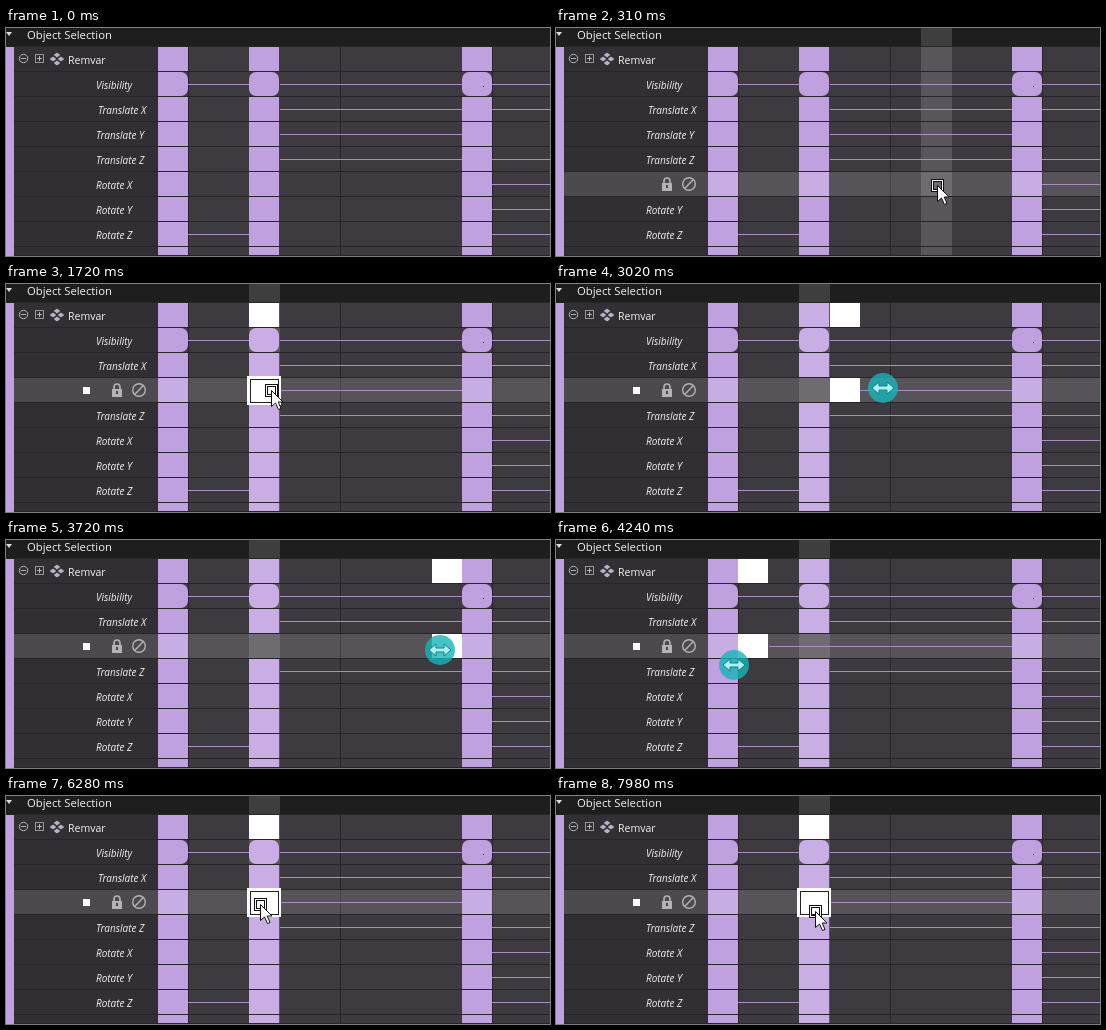
An HTML page with a canvas for the animation above (8000 ms loop, 544 by 228 pixels).

```html
<!DOCTYPE html>
<html>
<head>
<meta charset="utf-8">
<style>
html, body { margin: 0; width: 544px; height: 228px; overflow: hidden; background: #1f1e1f; }
canvas { display: block; }
</style>
</head>
<body>
<canvas id="stage" width="544" height="228"></canvas>
<script>
const c = document.getElementById('stage').getContext('2d');
const LOOP = 8000, LEFT = 152, CELL = 30.4, ROW = 25;
const SELECT = 1200, GRAB = 3020, DROP = 6280;
const PURPLE = '#bfa1df', INK = '#27252a', ICON = '#b4b3b6';

// Pointer path: time, x, y
const path = [
  [50, 500, 208], [310, 381, 157], [840, 272, 113], [960, 272, 113], [1020, 265, 106],
  [1140, 265, 106], [1200, 270, 113], [1450, 270, 113], [1720, 265, 106],
  [2459, 265, 106], [2460, 257, 97], [3019, 257, 97], [3020, 326, 104],
  [3220, 528, 104], [3530, 528, 104], [4240, 178, 125], [4690, 178, 125],
  [5330, 450, 114], [5510, 452, 115], [5650, 452, 115], [6280, 254, 108],
  [6729, 254, 108], [6730, 258, 112], [6790, 261, 117], [7979, 261, 117], [7980, 259, 115]
];

// Rows: label, label x, [from, to] columns of the value lines
const rows = [
  ['Visibility', 90, [1, 3], [4, 10], [11, 13]],
  ['Translate X', 92, [4, 10], [11, 13]],
  ['Translate Y', 90],
  ['Translate Z', 90, [4, 10], [11, 13]],
  ['Rotate X', 90, [11, 13]],
  ['Rotate Y', 90, [11, 13]],
  ['Rotate Z', 90, [1, 3], [11, 13]],
  ['', 90]
];

const colX = k => Math.round(LEFT + k * CELL);
const rowY = r => 44 + r * ROW;
const cellAt = x => Math.floor((x - LEFT) / CELL);

function pointer(t) {
  const i = path.findIndex(p => p[0] > t);
  if (i < 0) return path[path.length - 1].slice(1);
  if (!i) return null;
  const a = path[i - 1], b = path[i], u = (t - a[0]) / (b[0] - a[0]);
  return [1, 2].map(n => Math.round(a[n] + (b[n] - a[n]) * u));
}

function box(x, y, w, h, color) {
  c.fillStyle = color;
  c.fillRect(x, y, w, h);
}

function frame(x, y, w, h, color, width = 1) {
  c.strokeStyle = color;
  c.lineWidth = width;
  c.strokeRect(x, y, w, h);
}

function shape(points, fill, stroke) {
  c.beginPath();
  points.forEach(p => c.lineTo(...p));
  c.closePath();
  if (fill) { c.fillStyle = fill; c.fill(); }
  if (stroke) { c.strokeStyle = stroke; c.lineWidth = 1; c.stroke(); }
}

function text(s, x, y, font) {
  c.fillStyle = '#f2f2f2';
  c.font = font + ' "Open Sans", "Noto Sans", sans-serif';
  c.fillText(s, x, y);
}

function ring(x, y, r, width) {
  c.strokeStyle = ICON;
  c.lineWidth = width;
  c.beginPath();
  c.arc(x, y, r, 0, 7);
  c.stroke();
}

function key(k, y, color = PURPLE) {
  box(colX(k), y, 30, 24, color);
}

function tree() {
  shape([[0, 4], [6, 4], [3, 8]], '#dcdcdc');
  text('Object Selection', 21, 11, '500 11.3px');
  ring(17.5, 30.5, 4.2, 1);
  box(15, 30, 5, 1, ICON);
  frame(29.5, 26.5, 8, 8, '#98969b');
  box(31, 30, 5, 1, ICON);
  box(33, 28, 1, 5, ICON);
  for (const [x, y] of [[51, 27], [47, 31], [55, 31], [51, 35]])
    shape([[x - 4, y], [x, y - 3], [x + 4, y], [x, y + 3]], '#b9b2c4', '#322f34');
  text('Remvar', 62, 36, '500 10.5px');
}

function rowIcons(y) {
  box(106, y - 1, 10, 8, ICON);
  c.strokeStyle = ICON;
  c.lineWidth = 1.6;
  c.beginPath();
  c.moveTo(108, y);
  c.lineTo(108, y - 3);
  c.arc(111, y - 3, 3, Math.PI, 0);
  c.lineTo(114, y);
  c.stroke();
  box(110, y + 1, 2, 3, '#4c4a4e');
  ring(133, y, 6.3, 1.4);
  c.beginPath();
  c.moveTo(128.7, y + 4.5);
  c.lineTo(137.3, y - 4.5);
  c.stroke();
}

function arrow(x, y) {
  frame(x - 4.5, y - 4.5, 10, 10, '#fff', 3);
  frame(x - 5.5, y - 5.5, 12, 12, '#111');
  frame(x - 3.5, y - 3.5, 8, 8, '#111');
  const tip = [[0, 0], [0, 16], [4, 12.5], [7, 19], [9.5, 18], [6.7, 11.5], [11.5, 11.5]];
  shape(tip.map(p => [x + p[0] + .5, y + p[1] + .5]), '#fff', '#111');
}

function dragHandle(x, y) {
  c.globalAlpha = .8;
  c.fillStyle = '#15b5b8';
  c.beginPath();
  c.arc(x, y, 15, 0, 7);
  c.fill();
  c.globalAlpha = 1;
  const half = [[-11, 0], [-4, -6], [-4, -2], [4, -2], [4, -6]];
  const all = half.concat(half.map(p => [-p[0], -p[1]]));
  shape(all.map(p => [x + p[0], y + p[1]]), '#a9f3f3', '#147f84');
}

function draw(t) {
  const pos = pointer(t);
  const drag = t >= GRAB && t < DROP, selected = t >= SELECT;
  let moved = 3;
  if (drag) moved = t < 3080 ? 4 : Math.max(1, Math.min(9, cellAt(pos[0])));
  const hoverRow = !pos ? -1 : drag ? 2 : Math.floor((pos[1] - 44) / ROW);
  const hoverCol = !pos ? -1 : drag ? 3 : cellAt(pos[0]);

  box(0, 0, 544, 228, '#1f1e1f');
  box(0, 19, 8, 209, PURPLE);
  box(8, 19, 144, 209, '#322f34');
  box(LEFT, 19, 392, 209, '#3d3a40');
  for (const k of [1, 6, 11]) box(colX(k), 19, 1, 209, INK);

  for (const k of [0, 3, 10]) {
    key(k, 19);
    rows.forEach((row, r) => {
      if (r == 2 && k == 3) return;
      if (r) return key(k, rowY(r));
      c.fillStyle = PURPLE;
      c.beginPath();
      c.roundRect(colX(k), 44, 30, 24, k ? 7 : [0, 7, 7, 0]);
      c.fill();
    });
  }
  box(477, 58, 1, 1, '#111');

  // Row and column under the pointer
  if (hoverRow >= 0) box(8, rowY(hoverRow), 536, 24, 'rgba(255,255,255,.13)');
  if (hoverCol >= 0) box(colX(hoverCol), 0, 31, 228, 'rgba(255,255,255,.14)');

  box(8, 18, 536, 1, INK);
  for (let r = 0; r < 8; r++) box(8, rowY(r) - 1, 536, 1, INK);
  box(8, 227, 536, 1, INK);

  rows.forEach(([, , ...spans], r) => {
    if (r == 2) spans = [[moved + 1, 10]];
    for (const [a, b] of spans)
      if (b > a) box(colX(a), rowY(r) + 12, colX(b) - colX(a), 1, '#a78fc2');
  });

  const light = hoverRow == 2 ? '#d2b8eb' : hoverCol == 3 ? '#c8aee4' : PURPLE;
  key(moved, rowY(2), selected ? '#fff' : light);
  if (selected) key(moved, 19, '#fff');

  tree();
  rows.forEach(([label, x], r) => {
    if (r == hoverRow) rowIcons(rowY(r) + 12);
    else text(label, x, rowY(r) + 17, 'italic 500 10px');
  });
  if (selected) box(77, 103, 7, 7, '#fff');

  if (!pos) return;
  if (drag) return dragHandle(...pos);
  if ([0, 3, 10].includes(hoverCol) && (hoverRow != 2 || hoverCol == 3)) {
    const x = colX(hoverCol), y = rowY(hoverRow);
    frame(x - .5, y - .5, 31, 26, '#fff', 3);
    frame(x + 1.5, y + 1.5, 28, 23, '#222');
  }
  arrow(...pos);
}

function tick() {
  draw(performance.now() % LOOP);
  requestAnimationFrame(tick);
}
tick();
</script>
</body>
</html>
```
